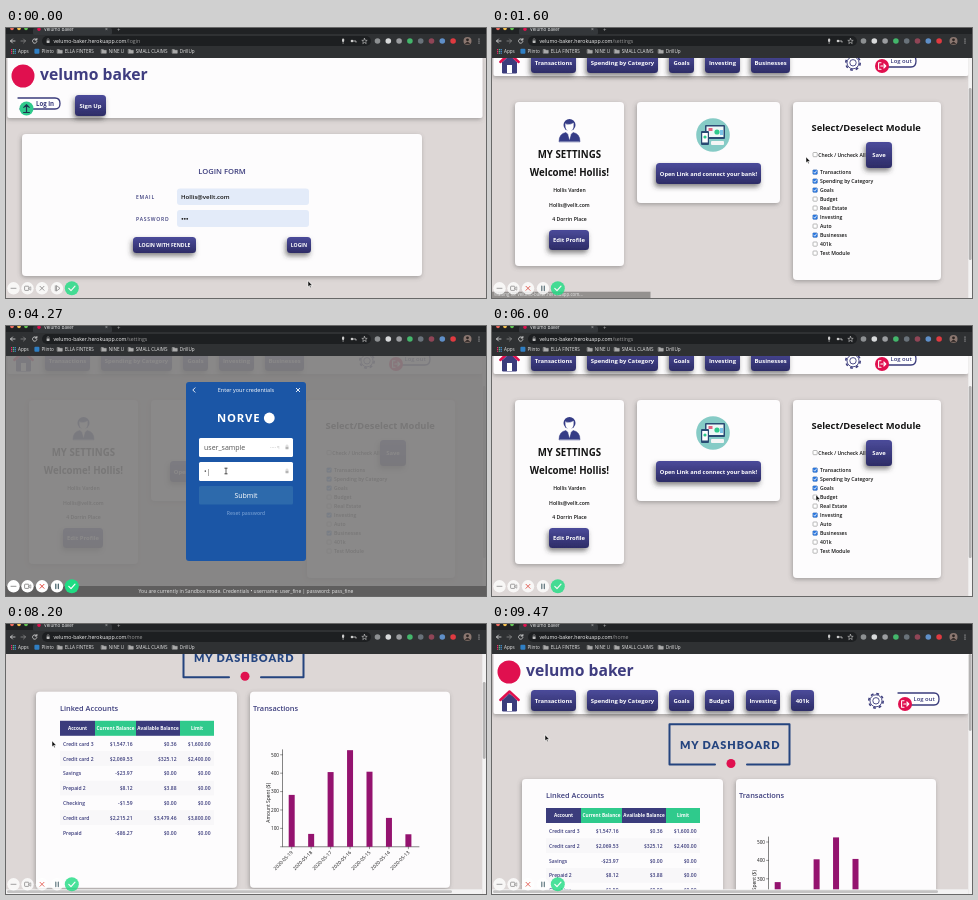
An HTML page that plays this animation: 480x270 px, repeating every 9.54 s.

```html
<!DOCTYPE html>
<html lang="en">
<head>
<meta charset="utf-8">
<title>Velumo Baker</title>
<style>
html, body { margin: 0; width: 100%; height: 100%; overflow: hidden; background: #ddd7d6; }
svg { display: block; width: 100vw; height: 100vh; }
text { font-family: "Open Sans", "Noto Sans", sans-serif; white-space: pre; }
</style>
</head>
<body>
<svg id="stage" viewBox="0 0 480 270" xmlns="http://www.w3.org/2000/svg"></svg>
<script>
const LOOP = 9540;
const NAVY = '#3b3c7c', GREEN = '#2fca8c', RED = '#e0104f', PURPLE = '#94136f', INK = '#141414', BLUE = '#1b56a6';
const BACK = '#ddd7d6', CARD = '#fdfcfd', SITE = 'velumo-baker.herokuapp.com';

// ---- drawing helpers ----
const rect = (x, y, w, h, fill, r = 0, more = '') =>
  `<rect x="${x}" y="${y}" width="${w}" height="${h}" rx="${r}" fill="${fill}" ${more}/>`;
const circle = (x, y, r, fill, more = '') => `<circle cx="${x}" cy="${y}" r="${r}" fill="${fill}" ${more}/>`;
const path = (d, stroke, w = 1, fill = 'none') =>
  `<path d="${d}" stroke="${stroke}" stroke-width="${w}" fill="${fill}" stroke-linecap="round" stroke-linejoin="round"/>`;
const text = (x, y, s, size, fill = INK, weight = 400, anchor = 'start', more = '') =>
  `<text x="${x}" y="${y}" font-size="${size}" fill="${fill}" font-weight="${weight}" text-anchor="${anchor}" ${more}>${s}</text>`;
const group = (id, body) => `<g id="${id}">${body}</g>`;
const card = (x, y, w, h) => rect(x, y, w, h, CARD, 4, 'filter="url(#soft)"');
const button = (x, y, w, h, label, size = 5.9) =>
  rect(x, y, w, h, 'url(#btn)', 3.5, 'filter="url(#drop)"') +
  text(x + w / 2, y + h / 2 + size * 0.36, label, size, '#fff', 700, 'middle');

// ---- browser frame ----
function browser() {
  let s = rect(0, 0, 480, 30, '#2f3133') + rect(0, 0, 480, 6, '#202224') + rect(27, 0, 79, 7, '#34373a', 2);
  ['#ec6a5e', '#f4bf4f', '#61c554'].forEach((c, i) => s += circle(6 + i * 7, 0.4, 1.8, c));
  s += circle(33, 1.2, 1.7, RED) + text(38, 3, 'Velumo Baker', 4.6, '#e6e6e6') + text(99, 3.2, '×', 5, '#bbb') + text(111, 3.6, '+', 6, '#bbb');
  s += rect(36, 8, 329, 10, '#1d1f21', 5);
  s += path('M9 13H4.5M6.5 11L4.5 13L6.5 15', '#ddd', 0.8) + path('M15 13H19.5M17.5 11L19.5 13L17.5 15', '#888', 0.8);
  s += path('M30.6 11.8A2.2 2.2 0 1 0 30.9 13.6M30.9 10.4V12.1H29.2', '#ddd', 0.8);
  s += rect(40.6, 12.4, 3, 2.6, '#bbb', 0.4) + path('M41.2 12.4V11.5A0.9 0.9 0 0 1 43 11.5V12.4', '#bbb', 0.5);
  s += `<text x="47.5" y="14.9" font-size="5.2" fill="#f2f2f2">${SITE}<tspan id="url" fill="#9a9a9a">/login</tspan></text>`;
  s += rect(336, 10.5, 2.2, 3.6, '#ccc', 1.1) + path('M337.1 14.2V15.6', '#ccc', 0.6);
  s += circle(346, 13, 1.3, '#ccc') + path('M347.5 13H350V14.2', '#ccc', 0.8);
  s += path('M358.5 10.4L359.3 12.3L361.2 12.4L359.7 13.7L360.2 15.6L358.5 14.5L356.8 15.6L357.3 13.7L355.8 12.4L357.7 12.3Z', '#ccc', 0.6);
  ['#8d9092', '#d8dadb', '#9b9da0', '#43b66b', '#69727a', '#8f4556', '#5f8fc8', '#df3a40'].forEach((c, i) => s += circle(371.5 + i * 10.8, 13, 2.8, c));
  s += circle(461.5, 13, 4, '#8b7770') + circle(461.5, 11.8, 1.4, '#2c2523') + path('M459.2 15.7Q461.5 12.3 463.8 15.7Z', '#2c2523', 0.4, '#2c2523');
  for (let i = 0; i < 3; i++) s += circle(473, 11 + i * 2, 0.6, '#ddd');
  for (let i = 0; i < 9; i++) s += rect(5 + i % 3 * 1.8, 21 + Math.floor(i / 3) * 1.8, 1.2, 1.2, ['#e26', '#5b8', '#49d'][i % 3]);
  s += text(12, 25.2, 'Apps', 4.6, '#e8e8e8') + rect(28.4, 20.8, 5, 5, '#2f7fc4', 1) + text(35.5, 25.2, 'Plinto', 4.6, '#e8e8e8');
  [[51, 'ELLA FINTERS'], [95, 'NINE U'], [122, 'SMALL CLAIMS'], [166, 'DrillUp']].forEach(([x, n]) =>
    s += path(`M${x + .5} 21.5H${x + 2.3}L${x + 3} 22.3H${x + 5.3}V25.2H${x + .5}Z`, '#aaa', 0.5, '#aaa') + text(x + 7.8, 25.2, n, 4.6, '#e8e8e8'));
  return s;
}

// ---- page header ----
const brand = () => rect(1.5, 28, 475, 62, CARD, 2, 'filter="url(#soft)"') +
  circle(17, 48, 11.5, RED) + text(34, 51.8, 'velumo baker', 15.7, '#3f3d80', 700);

function nav(labels, dx) {
  let s = brand();
  s += path('M10.5 76V87H24.5V76L17.5 70Z', NAVY, 1, NAVY) + path('M8.3 76L17.5 67.5L26.7 76', RED, 2.4) + rect(15, 79, 5, 8, '#fff');
  labels.forEach(([x, w, n]) => s += button(x, 66, w, 21, n));
  const gx = 384 + dx;
  s += circle(gx, 76.8, 7.2, 'none', `stroke="${NAVY}" stroke-width="1.6" stroke-dasharray="2.83"`) +
    circle(gx, 76.8, 6, '#fff', `stroke="${NAVY}" stroke-width=".9"`) + circle(gx, 76.8, 3.2, '#fff', `stroke="${NAVY}" stroke-width=".9"`);
  s += path(`M${406 + dx} 69H${442 + dx}Q${447 + dx} 69 ${447 + dx} 75Q${447 + dx} 81 ${442 + dx} 81H${413 + dx}`, NAVY, 1.3, '#fff') +
    text(421.5 + dx, 77.2, 'Log out', 5.9, NAVY, 600);
  s += circle(413 + dx, 80, 7, RED) + path(`M${412 + dx} 76.8H${409.6 + dx}V83.2H${412 + dx}M${411.8 + dx} 80H${416.8 + dx}M${414.8 + dx} 78L${416.8 + dx} 80L${414.8 + dx} 82`, '#fff', 1.1);
  return s;
}
const navStart = () => nav([[39, 45, 'Transactions'], [95, 71, 'Spending by Category'], [177, 25, 'Goals'], [213, 35, 'Investing'], [259, 39, 'Businesses']], -23);
const navEnd = () => nav([[39, 45, 'Transactions'], [95, 71, 'Spending by Category'], [177, 25, 'Goals'], [213, 29, 'Budget'], [254, 34, 'Investing'], [299, 23, '401k']], 0);

// ---- pages, in unscrolled coordinates ----
function login() {
  let s = brand() + path('M12 70H49Q54 70 54 75.5Q54 81 49 81H14', NAVY, 1.3, '#fff') + text(30, 77.7, 'Log in', 6.1, NAVY, 700);
  s += circle(20.5, 80.5, 7, GREEN) + path('M20.5 84.5V76.8M17.8 79.4L20.5 76.7L23.2 79.4M17.6 84.5H23.4', '#1b3550', 1.2);
  s += button(69, 67, 31, 21, 'Sign Up') + card(16, 106, 400, 142);
  s += text(216, 146.3, 'LOGIN FORM', 7.6, NAVY, 600, 'middle');
  s += text(130, 171.2, 'EMAIL', 5, NAVY, 600, 'start', 'letter-spacing=".8"') + text(130, 193.2, 'PASSWORD', 5, NAVY, 600, 'start', 'letter-spacing=".8"');
  s += rect(171, 160.5, 132, 16.5, '#e3ebf9', 3) + rect(171, 182, 132, 17, '#e3ebf9', 3);
  s += text(175, 171, 'Hollis@vellt.com', 6.1, INK, 600);
  for (let i = 0; i < 3; i++) s += circle(176.4 + i * 2.4, 190.8, 0.9, INK);
  return s + button(127, 209, 63, 16, 'LOGIN WITH FENDLE', 5.1) + button(281, 209, 24, 16, 'LOGIN', 5.1);
}

const modules = ['Transactions', 'Spending by Category', 'Goals', 'Budget', 'Real Estate', 'Investing', 'Auto', 'Businesses', '401k', 'Test Module'];
const box = (y, id) => rect(321, y - 2, 4.2, 4.2, '#fff', 0.7, 'stroke="#8a8a8a" stroke-width=".6"') +
  (id ? group(id, rect(320.7, y - 2.3, 4.8, 4.8, '#2a76dd', 0.8) + path(`M321.8 ${y + .1}L322.8 ${y + 1.2}L324.5 ${y - 1.1}`, '#fff', 0.8)) : '');

function settings() {
  let s = navStart() + card(23, 116, 109, 164) + card(145, 116, 143, 101) + card(301, 116, 148, 178);
  s += path('M67 155.5Q67 147.5 74 146.5L77.5 150L81 146.5Q88 147.5 88 155.5Z', '#353c86', 0.5, '#353c86') +
    circle(77.5, 139, 6, '#353c86') + path('M73.5 138Q77.5 139.5 81.5 137Q82 145 77.5 145.5Q73 145 73.5 138Z', '#fff', 0.3, '#fff') +
    path('M76.3 148.8L77.5 153.5L78.7 148.8Z', '#fff', 0.3, '#fff');
  const mid = (y, t, z, w) => text(77.4, y, t, z, INK, w, 'middle');
  s += mid(172, 'MY SETTINGS', 9.7, 650) + mid(190, 'Welcome! Hollis!', 9.7, 650);
  s += mid(206, 'Hollis Varden', 5.1, 600) + mid(220.8, 'Hollis@vellt.com', 5.1, 600) + mid(235, '4 Dorrin Place', 5.1, 600);
  s += button(57, 244, 40, 20, 'Edit Profile');
  s += circle(221, 149, 16.8, '#86cbc6') + rect(213, 139, 20, 14, '#294b73', 1) + rect(214.5, 140.5, 17, 10.5, '#eef8f7') +
    rect(209, 145, 8, 14, '#294b73', 1) + rect(210.2, 147, 5.6, 9.5, '#fff') + rect(219, 155, 13, 4, '#f5f5f5', 1) +
    circle(225, 146, 2.6, GREEN) + rect(216.5, 142, 4, 3, '#e26380') + circle(213, 151, 1.6, GREEN) + rect(228, 144, 3, 5, '#7ac3e8');
  s += button(164, 177, 105, 21, 'Open Link and connect your bank!', 5.7);
  s += text(319.5, 145, 'Select/Deselect Module', 9.4, INK, 650) + box(168.5) + text(326.3, 170.6, 'Check / Uncheck All', 5, INK, 600) + button(374, 156, 26, 26, 'Save');
  modules.forEach((m, i) => s += box(186 + i * 9, 'box' + i) + text(328, 188 + i * 9, m, 5.1, INK, 600));
  return s;
}

function table(x, y, widths, heads, rows) {
  let s = '', cx = x;
  const ends = [];
  widths.forEach((w, i) => {
    s += rect(cx, y, w, 15, i % 2 ? GREEN : NAVY) + text(cx + w / 2, y + 9.3, heads[i], 4.7, '#fff', 700, 'middle');
    ends.push(cx += w);
  });
  rows.forEach((row, r) => {
    const by = y + 25 + r * 14.8;
    if (r % 2) s += rect(x, by - 9.5, cx - x, 14.8, '#f8f7f9');
    row.split('|').forEach((c, i) => s += i ? text(ends[i] - 3.5, by, c, 5, NAVY, 600, 'end') : text(x + 3, by, c, 5, NAVY, 600));
  });
  return s;
}

function donut(cx, cy, R, r) {
  const at = (a, q) => `${cx + q * Math.sin(a * Math.PI / 180)} ${cy - q * Math.cos(a * Math.PI / 180)}`;
  const cuts = [0, 119, 162, 296, 360];
  return [GREEN, PURPLE, RED, NAVY].map((c, i) => {
    const a = cuts[i], b = cuts[i + 1], big = b - a > 180 ? 1 : 0;
    return path(`M${at(a, R)}A${R} ${R} 0 ${big} 1 ${at(b, R)}L${at(b, r)}A${r} ${r} 0 ${big} 0 ${at(a, r)}Z`, '#fff', 1.2, c);
  }).join('');
}

function dashboard() {
  let s = path('M223 140.5H177.5V100.3H297.5V140.5H255', '#24447f', 2) + circle(239, 139.5, 4.5, RED);
  s += text(238.2, 125.2, 'MY DASHBOARD', 10.9, '#24447f', 900, 'middle', 'letter-spacing=".95" style="font-family:Lato,sans-serif"');
  s += card(30, 155, 201, 196) + card(244, 155, 200, 196) + card(30, 365, 201, 183) + card(244, 365, 200, 183) + card(137, 562, 200, 184);
  const head = (x, y, t) => text(x, y, t, 7.4, NAVY, 600);
  s += head(54, 174, 'Linked Accounts') + head(247, 174, 'Transactions') + head(54, 384, 'Spending by Category') + head(262, 384, 'Goals') + head(140.5, 581, 'Goals - Target VS Current');
  s += table(54, 184, [35, 41, 44, 34], ['Account', 'Current Balance', 'Available Balance', 'Limit'], [
    'Credit card 3|$1,547.16|$0.36|$1,600.00', 'Credit card 2|$2,069.53|$325.12|$2,400.00', 'Savings|-$23.97|$0.00|$0.00',
    'Prepaid 2|$8.12|$3.88|$0.00', 'Checking|-$1.59|$0.00|$0.00', 'Credit card|$2,215.21|$3,479.46|$3,800.00', 'Prepaid|-$86.27|$0.00|$0.00']);
  s += table(262, 394, [35, 33, 43, 53], ['Description', 'Target', 'Current Amount', 'Still need to be saved'], [
    'Trip to Italy|$3,000.00|$1,200.00|$1,800.00', 'Wedding|$8,000.00|$1,550.00|$6,450.00', 'College|$3,000.00|$1,000.00|$2,000.00',
    'Beach House|$8,500.00|$6,000.00|$2,500.00', 'ITALY|$2,500.00|$500.00|$2,000.00', 'DUBAI|$2,500.00|$200.00|$2,300.00', 'ROME|$3,000.00|$200.00|$2,800.00']);
  // bar chart
  s += path('M276.5 213V310H413', '#333', 0.6);
  for (let v = 0; v <= 500; v += 100) {
    const y = 310 - v * 0.184;
    s += path(`M274.5 ${y}H276.5`, '#333', 0.5) + (v ? text(273, y + 1.8, v, 4.7, INK, 500, 'end') : '');
  }
  s += text(0, 0, 'Amount Spent ($)', 4.9, INK, 500, 'middle', 'transform="translate(263.5 266) rotate(-90)"');
  [282, 70, 406, 525, 408, 157, 68].forEach((v, i) => {
    const x = 285.7 + i * 19.45, h = v * 0.184;
    s += rect(x - 3, 310 - h, 6, h, PURPLE) + path(`M${x} 310V312`, '#333', 0.5) +
      text(0, 0, '2020-05-' + (19 - i), 4.8, INK, 500, 'end', `transform="translate(${x + 1.5} 316) rotate(-45)"`);
  });
  // category ring
  s += donut(131, 456, 36.5, 14.5);
  [[92.5, 421.5, 'Miscellaneous'], [165.5, 440, 'Shops'], [147.5, 494, 'Travel'], [81, 484, 'Service']].forEach(([x, y, n]) => s += text(x, y, n, 5.6, NAVY, 600));
  // goals plot
  s += circle(237, 624, 3.5, NAVY) + path('M174 625V628M170 690H310M174 628V690', '#555', 0.6) + text(197, 629, '8K', 4.6);
  [[196, 652], [215, 668], [258, 660], [280, 645]].forEach(([x, y], i) => s += circle(x, y, 3, i % 2 ? GREEN : NAVY));
  return s;
}

// ---- bank link window ----
const ring = (id, c) => `<g id="${id}"><path d="M240 137A9 9 0 1 1 231 146" stroke="${c}" stroke-width="1.8" fill="none" stroke-linecap="round"/></g>`;
function linkWindow() {
  const top = (t, c) => text(240, 66.2, t, 5.5, c, 500, 'middle') + path('M189 61.8L186.8 64L189 66.2', c, 0.9) + path('M290.3 62.3L293.7 65.7M293.7 62.3L290.3 65.7', c, 0.9);
  const bank = text(211, 96.2, 'NORVE', 11.3, '#fff', 700, 'start', 'letter-spacing=".8"') + circle(263.3, 92, 5.4, '#fff');
  const white = rect(180, 56, 120, 179, '#fff', 3), blue = rect(180, 56, 120, 179, BLUE, 3);
  const lock = y => rect(279.5, y, 3, 2.6, '#b5b5b5', 0.4) + path(`M280.1 ${y}V${y - .9}A.9 .9 0 0 1 281.9 ${y - .9}V${y}`, '#b5b5b5', 0.5);
  const proceed = rect(190, 206, 100, 18, '#1b1b1b', 2) + text(240, 217.3, 'Continue', 6.4, '#fff', 600, 'middle');
  const consent = white + top('', '#444') + circle(233, 92, 8, '#222') + circle(247, 92, 8, RED) + text(240, 121, 'Connect your bank', 8, '#222', 700, 'middle') +
    text(240, 145, 'Secure', 6, '#333', 600, 'middle') + text(240, 153, 'Your data is encrypted', 5, '#777', 400, 'middle') +
    text(240, 172, 'Private', 6, '#333', 600, 'middle') + text(240, 180, 'Your login is never shared', 5, '#777', 400, 'middle') + proceed;
  let banks = white + top('Select your bank', '#333') + rect(188, 74, 104, 14, '#f2f3f5', 2) + text(194, 83, 'Search', 5.6, '#999');
  for (let i = 0; i < 8; i++)
    banks += rect(188 + i % 2 * 53, 94 + (i >> 1) * 34, 51, 31, '#fff', 2, 'stroke="#ddd" stroke-width=".7"') +
      circle(213.5 + i % 2 * 53, 109.5 + (i >> 1) * 34, 7, [BLUE, '#c8283c', '#2a6fb8', '#d8403a', '#2d9b63', '#e07b2c', '#1d4775', '#6c4a9b'][i]);
  const creds = blue + top('Enter your credentials', '#fff') + bank + rect(193, 112, 94, 19, '#fff', 1.5) + rect(193, 136, 94, 19, '#fff', 1.5) +
    '<text id="user" x="198" y="124" font-size="7" fill="#555"></text><text id="pass" x="198" y="148" font-size="7" fill="#555"></text>' +
    text(264, 123, '•••• ¶', 4, '#ccc') + lock(120.7) + lock(144.7) + rect(193, 160, 94, 18.5, '#2d6aac', 1.5) +
    text(240, 171.8, 'Submit', 7, '#fff', 500, 'middle') + text(240, 188.8, 'Reset password', 5.1, '#6d98cf', 600, 'middle');
  const done = white + top('', '#444') + circle(240, 108, 15, GREEN) + path('M233 108L238 113L247 103', '#fff', 2.4) +
    text(240, 145, 'Success', 9, '#222', 700, 'middle') + text(240, 158, 'Your accounts are linked', 5.4, '#777', 400, 'middle') + proceed;
  return rect(0, 30, 480, 240, '#817f7f', 0, 'opacity=".92"') + rect(0, 260, 480, 10, '#5f5e5e') +
    text(240, 266.7, 'You are currently in Sandbox mode. Credentials • username: user_fine | password: pass_fine', 5, '#e4e4e4', 400, 'middle') +
    group('step0', white + ring('spin0', '#555')) + group('step1', consent) + group('step2', banks) + group('step3', creds) +
    group('step4', blue + bank + ring('spin4', '#fff')) + group('step5', done);
}

function recorder() {
  let s = '';
  [7.5, 21.5, 36, 51].forEach(x => s += circle(x, 260.3, 6.2, '#fff'));
  s += circle(65.8, 260.3, 7, '#1fdc83') + path('M62.8 260.4L65 262.6L69 258.2', '#fff', 1.2);
  s += path('M5 260.3H10', '#777', 0.8) + rect(18.6, 258.2, 4.2, 4.2, 'none', 0.6, 'stroke="#777" stroke-width=".8"') + path('M22.8 260.3L24.8 258.8V261.8Z', '#777', 0.6);
  s += '<path id="cancel" d="M34 258.3L38 262.3M38 258.3L34 262.3" stroke-width="1" stroke-linecap="round"/>';
  return s + group('pause', path('M49.8 258V262.6M52.3 258V262.6', '#3c5a63', 1.2)) + group('play', path('M49.3 257.8V262.8M50.8 257.8L54 260.3L50.8 262.8Z', '#777', 0.8));
}

document.getElementById('stage').innerHTML = `<defs>
  <linearGradient id="btn" x1="0" y1="0" x2="0" y2="1"><stop offset="0" stop-color="#4b4b9a"/><stop offset="1" stop-color="#2d2c66"/></linearGradient>
  <filter id="soft" x="-10%" y="-10%" width="120%" height="125%"><feDropShadow dx="-.8" dy="1.5" stdDeviation="2" flood-color="#555" flood-opacity=".45"/></filter>
  <filter id="drop" x="-50%" y="-50%" width="200%" height="230%"><feDropShadow dx="-1.5" dy="3" stdDeviation="2.8" flood-color="#333" flood-opacity=".6"/></filter></defs>` +
  rect(0, 0, 480, 270, BACK) + group('login', login()) + group('settings', settings()) +
  group('home', group('navA', navStart()) + group('navB', navEnd()) + dashboard()) +
  group('bars', rect(476.3, 30, 3.7, 240, '#f3f2f2') + '<rect id="thumb" x="476.8" width="2.8" rx="1.4" fill="#b4b3b3"/>') +
  group('hbar', rect(0, 265.3, 476, 4.7, '#f3f2f2') + rect(1, 266.2, 445, 2.9, '#c3c2c2', 1.4)) +
  group('wait', rect(0, 263.7, 158.5, 6.3, '#94918f') + text(2, 268.4, 'Waiting for ' + SITE + '...', 4.4, '#e4e4e4')) +
  group('link', linkWindow()) + browser() + group('recorder', recorder()) +
  group('arrow', path('M0 0V5.8L1.4 4.6L2.3 6.7L3.2 6.3L2.3 4.3H4.2Z', '#fff', 0.5, '#111')) +
  group('beam', path('M-1.2 -2.8H1.2M0 -2.8V2.8M-1.2 2.8H1.2', '#222', 0.7));

// ---- motion ----
const el = {};
document.querySelectorAll('#stage [id]').forEach(e => el[e.id] = e);
const show = (id, on) => el[id].setAttribute('display', on ? 'inline' : 'none');
const ease = (t, a, b) => { const k = Math.min(1, Math.max(0, (t - a) / (b - a))); return k * k * (3 - 2 * k); };
const typed = (s, t, a, b) => s.slice(0, Math.max(0, Math.floor(s.length * Math.min(1, (t - a) / (b - a)))));

const route = [[0, 302, 253], [380, 293, 216], [680, 293, 216], [1150, 361, 76], [1300, 361, 76], [1600, 314, 129], [1950, 220, 146], [2200, 220, 146],
  [2500, 240, 214], [2850, 240, 214], [3250, 214, 110], [3650, 214, 110], [3800, 220, 122], [4180, 220, 145], [4450, 220, 145], [4650, 240, 169],
  [5250, 240, 214], [5650, 240, 214], [5950, 324, 169], [6120, 324, 169], [6300, 323, 205], [6420, 323, 205], [6500, 323, 214], [6620, 323, 214],
  [6800, 386, 128], [6980, 386, 128], [7200, 17, 76], [7300, 17, 76], [7520, 46, 117], [9050, 46, 117], [9380, 53, 111]];
function pointer(t) {
  let i = 0;
  while (i < route.length - 2 && t >= route[i + 1][0]) i++;
  const [a, x, y] = route[i], [b, u, v] = route[i + 1], k = ease(t, a, b);
  return [x + (u - x) * k, y + (v - y) * k];
}

function draw(t) {
  const page = t < 730 ? 'login' : t < 1300 || t >= 7280 ? 'home' : 'settings';
  ['login', 'home', 'settings'].forEach(p => show(p, p === page));
  el.url.textContent = '/' + page;
  show('navA', t < 7000);
  show('navB', t >= 7000);

  const scroll = page === 'settings' ? 42 * (ease(t, 1380, 1540) - ease(t, 7060, 7180))
    : page === 'home' && t > 7000 ? 65 * ease(t, 7360, 7590) + 296 * ease(t, 8060, 8900) - 361 * ease(t, 9040, 9450) : 0;
  el[page].setAttribute('transform', `translate(0 ${-scroll})`);
  const full = page === 'home' ? 748 : 335;
  show('bars', page !== 'login');
  show('hbar', page === 'home');
  el.thumb.setAttribute('y', 30 + scroll * 240 / full);
  el.thumb.setAttribute('height', 57600 / full);
  show('wait', t >= 1330 && t < 1800);

  const checked = i => i === 3 ? t >= 6070 : i === 7 ? t < 6370 : i === 8 ? t >= 6570 : [0, 1, 2, 5].includes(i);
  modules.forEach((m, i) => show('box' + i, checked(i)));

  const linking = t >= 2200 && t < 5660;
  show('link', linking);
  const step = [2530, 2800, 3600, 4670, 5200, LOOP].findIndex(e => t < e);
  for (let i = 0; i < 6; i++) show('step' + i, i === step);
  ['spin0', 'spin4'].forEach(id => el[id].setAttribute('transform', `rotate(${t * 0.45} 240 146)`));
  el.user.textContent = typed('user_sample', t, 3720, 4130) + (t > 3680 && t < 4180 ? '|' : '');
  el.pass.textContent = typed('•••••••••', t, 4200, 4640) + (t >= 4180 ? '|' : '');

  const live = t > 1000;
  el.recorder.setAttribute('opacity', linking ? 1 : 0.8);
  el.cancel.setAttribute('stroke', live ? '#e2483d' : '#888');
  show('pause', live);
  show('play', !live);

  const [x, y] = pointer(t), typing = t > 3700 && t < 4560;
  show('arrow', !typing);
  show('beam', typing);
  el[typing ? 'beam' : 'arrow'].setAttribute('transform', `translate(${x} ${y})`);
}

const start = performance.now();
function tick() {
  draw((performance.now() - start) % LOOP);
  requestAnimationFrame(tick);
}
draw(0);
tick();
</script>
</body>
</html>
```
